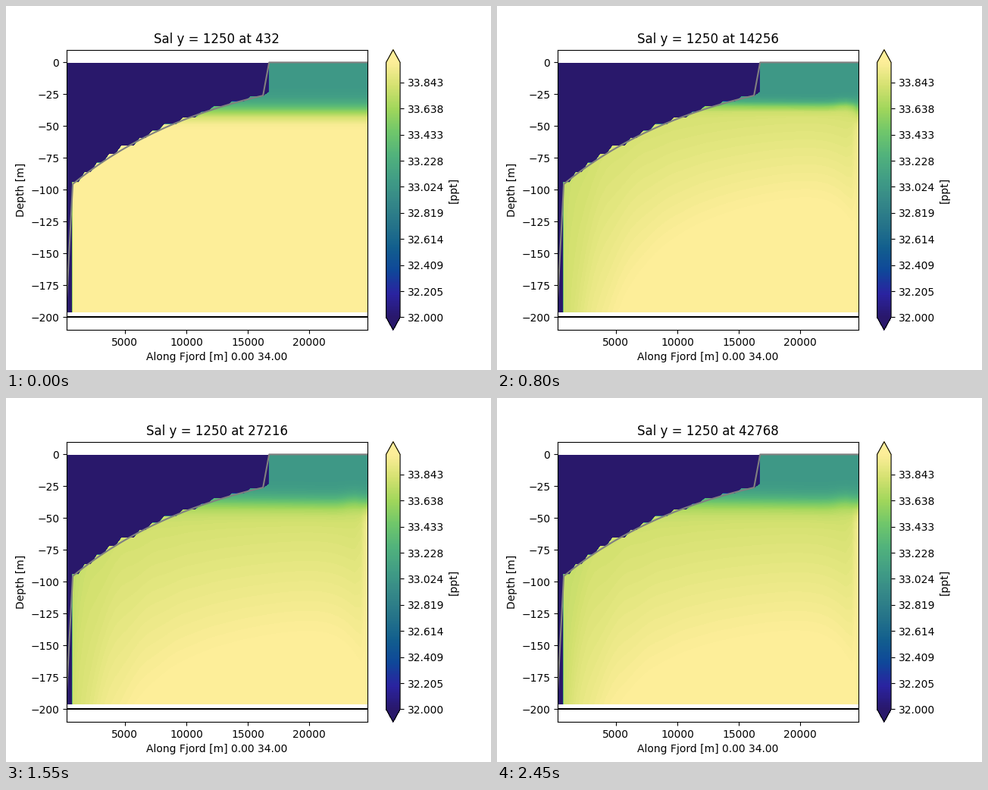
Write a matplotlib script that moves like this. It is 640 by 480 pixels and loops after 2500 ms.

```python
import numpy as np
import matplotlib.pyplot as plt
from matplotlib.animation import FuncAnimation
from matplotlib.colors import LinearSegmentedColormap

FRAMES = 50
INTERVAL = 50
TOP, FULL = 33.04, 34.03
LEFT, TOE, LIP, RIGHT = 250, 750, 16250, 24750

# Deep blue to pale yellow, evenly spaced stops
STOPS = ["#29186b", "#2a23a0", "#0f4799", "#125f8e", "#267489", "#358888",
         "#419d85", "#51b27c", "#6fc66b", "#a0d65b", "#d4e170", "#fdee99"]
cmap = LinearSegmentedColormap.from_list("salt", STOPS, 256)
levels = np.linspace(32, 34, 128)

# Cell centres: uniform along the fjord, stretched with depth
x = np.arange(LEFT, RIGHT + 1, 500.0)
depth = np.geomspace(27.45, 222.9, 32) - 26.9
X, D = np.meshgrid(x, depth)

# Underside of the ice: steep wall, decaying slope, then open water
BEND = 1.25
along = (x - TOE) / (LIP - TOE)
draft = 95.5 - 69.5 * (1 - np.exp(-BEND * along)) / (1 - np.exp(-BEND))
draft[x < TOE] = 186
draft[x > LIP] = 0

# A cell is ice when its lower face lies above the draft
faces = np.append((depth[1:] + depth[:-1]) / 2, depth[-1])
ICE = (faces[:, None] < draft) | (X < TOE)


def layer(centre, width):
    return 0.5 + 0.5 * np.tanh((D - centre) / width)


def salinity(i):
    ramp = 1 - np.exp(-i / 10)
    pulse = np.exp(-((i - 16) / 6) ** 2)
    from_ice = np.exp(-(X - TOE) / 3000)
    to_sea = RIGHT - X

    # Fresh plume rising along the ice, salty below the saturation depth
    plume = (4e5 + 7e5 * np.exp(-i / 15)) * (1 - np.exp(-i / 3))
    floor = 115 * (1 - np.exp(-(i / 16) ** 2))
    saturated = floor + plume / X + 50 * ramp * np.exp(-to_sea / 1500)
    q = np.clip(D / np.maximum(saturated, 1), 0, 1.15)
    mixed = 33.71 + 0.1 * np.exp(-i / 14)
    deep = np.minimum(mixed + (34 - mixed) * q, FULL)
    deep -= 0.012 * ramp * from_ice * (q < 1) * np.sin(X / 420 + D / 35 - i / 2)

    # Sharp upper layer, lifted towards the ice and just inside the boundary
    lift = to_sea / 10000 + 2 * np.exp(-((X - 23700) / 900) ** 2)
    field = TOP + (deep - TOP) * layer(38 - 4 * pulse - ramp * lift,
                                       8 - 4 * pulse)

    # Open boundary keeps the starting profile
    start = TOP + (FULL - TOP) * layer(38.5, 8.5)
    field += (start - field) * 0.75 * ramp * np.exp(-to_sea / 300)
    field[ICE] = 0
    return field


def draw_field(i):
    return ax.contourf(x, -depth, salinity(i), levels, cmap=cmap, extend="both")


fig, ax = plt.subplots(figsize=(6.4, 4.8), dpi=100)
contours = draw_field(0)
fig.colorbar(contours, ax=ax).set_label("[ppt]")

ax.plot(x, -draft, color="grey")
ax.plot(x, np.full_like(x, -200), color="black")
ax.set_xlim(LEFT, RIGHT)
ax.set_ylim(-210, 10)
ax.set_xlabel("Along Fjord [m] 0.00 34.00")
ax.set_ylabel("Depth [m]")
title = ax.set_title("")


def update(i):
    global contours
    contours.remove()
    contours = draw_field(i)
    title.set_text(f"Sal y = 1250 at {432 + 864 * i}")
    return contours, title


anim = FuncAnimation(fig, update, frames=FRAMES, interval=INTERVAL,
                     init_func=lambda: (), repeat=True, repeat_delay=0)
plt.show()
```
